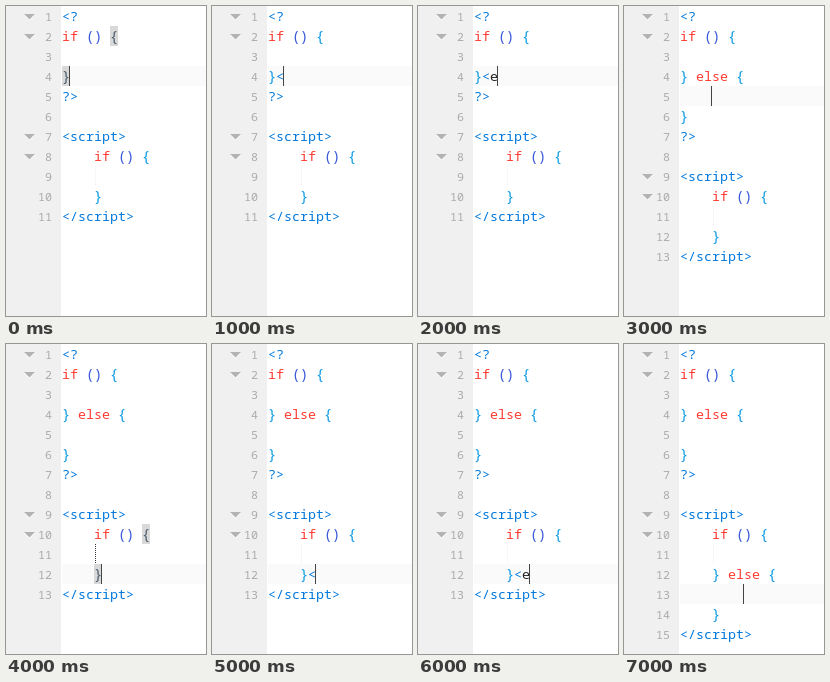
Animation, 200 px wide and 310 px high, one loop 8 s. Source, as an HTML page:

```html
<!DOCTYPE html>
<html lang="en">
<head>
<meta charset="utf-8">
<title>Else snippet expansion</title>
<style>
  html, body { margin: 0; width: 100%; height: 100%; overflow: hidden; background: #fff; }
  svg { display: block; }
  text { font: 500 13.333px "Noto Sans Mono", "DejaVu Sans Mono", monospace; text-anchor: middle; }
  .number { font-size: 11.667px; font-weight: 400; fill: #aaa; text-anchor: end; }
  .tag { fill: #0078dc; }
  .keyword { fill: #ff3a30; }
  .paren { fill: #3a5ad8; }
  .brace { fill: #0a9ae4; }
  .plain { fill: #222; }
  .matched { fill: #4a5c6c; }
  .paren, .brace, .matched { font-size: 14.5px; }
</style>
</head>
<body>
<svg id="editor" width="200" height="310" viewBox="0 0 200 310"></svg>
<script>
const editor = document.getElementById('editor');
const LEFT = 56, CHAR = 8, ROW = 20, STEP = 1000;

const rect = (x, y, w, h, fill) =>
  `<rect x="${x}" y="${y}" width="${w}" height="${h}" fill="${fill}"/>`;

const foldArrow = (y, fill) => `<path d="M18 ${y}h11l-5.5 5.5z" fill="${fill}"/>`;

const escapeText = s => s.replace(/</g, '&lt;').replace(/>/g, '&gt;');

// An if block, optionally followed by what has been typed or expanded.
function block(indent, typed) {
  const tail = typed === 'else' ? ['} else {', '', '}'] : ['}' + typed];
  return ['if () {', '', ...tail].map(line => line && indent + line);
}

const documentLines = (first, second) =>
  ['<?', ...block('', first), '?>', '', '<script>', ...block('    ', second), '<\/script>'];

// Snippet text of both blocks, caret row and column, matched braces [row, column].
const states = [
  ['', '', 3, 1, [[1, 6], [3, 0]]],
  ['<', '', 3, 2],
  ['<e', '', 3, 3],
  ['else', '', 4, 4],
  ['else', '', 11, 5, [[9, 10], [11, 4]]],
  ['else', '<', 11, 6],
  ['else', '<e', 11, 7],
  ['else', 'else', 12, 8]
];

function tokenClass(token) {
  if (/^(if|else)$/.test(token)) return 'keyword';
  if (/[()]/.test(token)) return 'paren';
  if (/[{}]/.test(token)) return 'brace';
  return /[<>]|script/.test(token) ? 'tag' : 'plain';
}

function drawLine(line, row, matches) {
  const y = row * ROW + 15;
  let out = `<text class="number" x="46" y="${y}">${row + 1}</text>`;
  if (/^<(\?|script)|^ *if/.test(line)) {
    out += foldArrow(y - 6, '#fff') + foldArrow(y - 7, '#b3b3b3');
  }
  for (const { 0: token, index } of line.matchAll(/<\?|\?>|<\/?script>|\w+|\S/g)) {
    const matched = matches.some(([r, c]) => r === row && c === index);
    const style = matched ? 'matched' : tokenClass(token);
    const center = LEFT + (index + token.length / 2) * CHAR;
    out += `<text class="${style}" x="${center}" y="${y}">${escapeText(token)}</text>`;
  }
  return out;
}

function drawState([first, second, row, column, matches = []]) {
  const lines = documentLines(first, second);
  const guideRow = lines.indexOf('<script>') + 2;
  const guideColor = matches.length && row > guideRow ? '#333' : '#eee';
  return rect(0, 0, 200, 310, '#fff') +
    rect(0, 0, 55, 310, '#f0f0f0') +
    rect(LEFT, row * ROW, 144, ROW, '#fafafa') +
    matches.map(([r, c]) => rect(LEFT + c * CHAR, r * ROW, CHAR, ROW, '#d9d9d9')).join('') +
    `<path d="M89.5 ${guideRow * ROW}v${ROW}" stroke="${guideColor}" stroke-dasharray="1"/>` +
    lines.map((line, i) => drawLine(line, i, matches)).join('') +
    rect(LEFT + column * CHAR - 1, row * ROW, 1, ROW, '#444');
}

let shown = -1;
function tick() {
  const index = Math.floor(performance.now() / STEP) % states.length;
  if (index !== shown) editor.innerHTML = drawState(states[shown = index]);
  requestAnimationFrame(tick);
}
tick();
</script>
</body>
</html>
```
